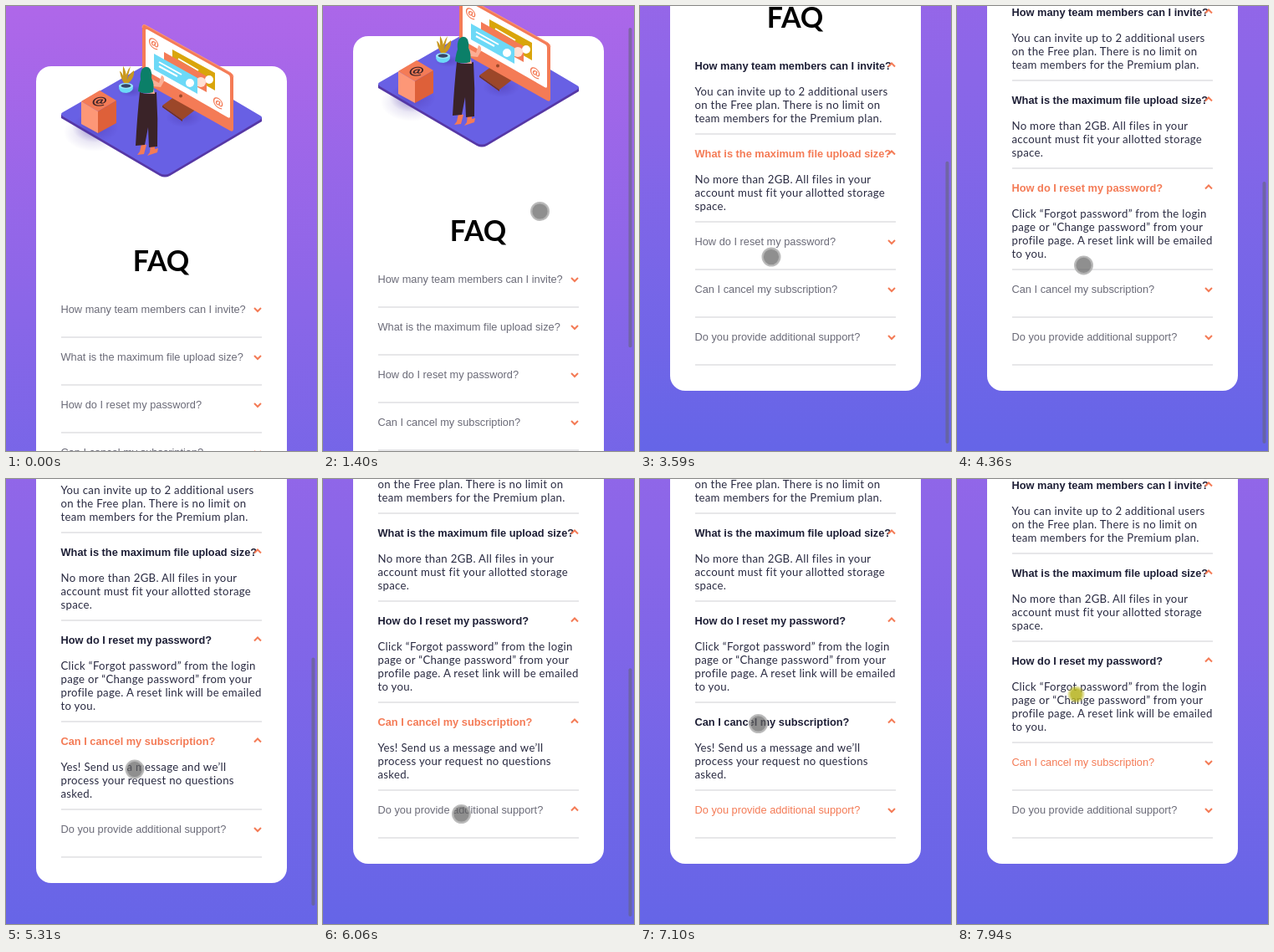
An HTML page for the animation above (8 s loop, 372x532 px).

```html
<!DOCTYPE html>
<html lang="en">
<head>
<meta charset="utf-8">
<title>FAQ</title>
<style>
html, body { margin: 0; width: 100%; height: 100%; overflow: hidden; background: #af67e9; }
#stage { display: block; width: 372px; height: 532px; }
.title { font: 700 34px Lato, "Open Sans", sans-serif; text-anchor: middle; }
.question { font: 12.8px "Liberation Sans", Arial, sans-serif; }
.answer { font: 13.2px Lato, "Open Sans", sans-serif; letter-spacing: .3px; fill: #2a2b42; }
.at { font: 700 15px Lato, sans-serif; text-anchor: middle; }
.chevron { fill: none; stroke: #f47b56; stroke-width: 2; }
</style>
</head>
<body>
<svg id="stage" viewBox="0 0 372 532">
  <defs>
    <linearGradient id="sky" x2="0" y2="1"><stop stop-color="#af67e9"/><stop offset="1" stop-color="#6565e7"/></linearGradient>
    <radialGradient id="shade"><stop stop-color="#4b35a8" stop-opacity=".45"/><stop offset="1" stop-color="#4b35a8" stop-opacity="0"/></radialGradient>
    <radialGradient id="glow"><stop offset=".6" stop-color="#b5b21c" stop-opacity=".85"/><stop offset="1" stop-color="#c9c640" stop-opacity=".25"/></radialGradient>
  </defs>
  <g id="page">
    <rect id="backdrop" width="372" fill="url(#sky)"/>
    <rect id="card" x="36" y="72" width="300" rx="18" fill="#fff"/>

    <g id="art">
      <ellipse cx="106" cy="151" rx="37" ry="23" fill="url(#shade)" opacity=".55"/>
      <path d="M66 130V134L184 203Q190 206 196 203L306 138V133Z" fill="#5637a5"/>
      <path d="M68 127L178 64Q184 60 190 64L304 131Q308 133 304 136L196 200Q190 203 184 200L68 132Q64 129 68 127Z" fill="#6860e4"/>
      <ellipse cx="107" cy="145" rx="28" ry="18" fill="url(#shade)"/>
      <ellipse cx="213" cy="133" rx="22" ry="12" fill="url(#shade)"/>
      <ellipse cx="150" cy="102" rx="16" ry="7" fill="url(#shade)"/>

      <path d="M143 94C141 83 138 78 136 78Q138 90 143 94C146 84 142 74 140 72Q139 86 143 94C151 91 154 82 153 77Q145 83 143 94L149 72Q142 80 143 94" fill="#c9981f"/>
      <path d="M135 95Q134 104 144 104Q153 103 152 95Z" fill="#6cd9f7"/>
      <ellipse cx="143.500" cy="95.500" rx="8.500" ry="3.500" fill="#9be8fb"/>
      <ellipse cx="143.500" cy="95.500" rx="6" ry="2.200" fill="#37446a"/>

      <path d="M90 114L112 101L132 113L110 126Z" fill="#f47b56"/>
      <path d="M90 114L110 126V152L90 141Z" fill="#fd9777"/>
      <path d="M110 126L132 113V140L110 152Z" fill="#de6039"/>
      <text class="at" transform="translate(110.500 117.500) scale(1.400 .9) skewX(-10)" fill="#3a2328">@</text>

      <path d="M187 119L202 108L228 123L211 136Z" fill="#9c4729"/>
      <path d="M187 119V121L211 138V136Z" fill="#74301c"/>
      <path d="M163 26Q163 21 167 23L269 80Q272 82 272 85V147Q272 151 268 149L163 90Z" fill="#f47b56"/>
      <path d="M167 29Q167 27 169 28L266 82Q268 83 268 86V132Q268 135 265 133L167 77Z" fill="#fff"/>
      <path d="M163 26Q163 21 167 23L269 80Q272 82 272 85" fill="none" stroke="#fd9777"/>
      <circle cx="209" cy="107.500" r="2" fill="#9c4729"/>
      <path d="M199 52L250 80V101L199 72Z" fill="#d9a50b"/>
      <path d="M206 63L230 77" stroke="#fff" stroke-width="2"/>
      <path d="M189 55L240 84V103L189 75Z" fill="#f47b56"/>
      <circle cx="243" cy="88" r="5" fill="#fff"/>
      <circle cx="233" cy="91" r="6" fill="#ffe0d4"/>
      <path d="M177 57L229 86V105L177 76Z" fill="#6cd9f7"/>
      <path d="M183 67L210 82M183 72L205 84" stroke="#fff" stroke-width="2"/>
      <circle cx="220" cy="92" r="5" fill="#fff"/>
      <text class="at" transform="translate(176.500 49) skewY(28)" fill="#f47b56">@</text>
      <text class="at" transform="translate(253.500 120) skewY(28)" fill="#f47b56">@</text>

      <path d="M162 165L160 174L157 178L165 177L168 166ZM173 166L172 175L169 179L181 175L182 170L178 171V165Z" fill="#f47b56"/>
      <path d="M160 103Q169 107 180 103Q182 135 181 168L171 169L170 145L166 166L155 167Q157 130 160 103Z" fill="#3a2328"/>
      <path d="M172 86L183 92L186 83Q190 84 189 90L185 97L176 96L178 105L164 104Z" fill="#fcae94"/>
      <path d="M163 75Q169 70 173 76Q175 81 174 86Q178 94 176 103Q166 106 158 102Q159 93 161 88Q160 80 163 75Z" fill="#0b7f68"/>
    </g>

    <text class="title" x="185.500" y="317">FAQ</text>
    <g id="items"></g>
  </g>
  <rect id="thumb" x="365.500" width="4" rx="2" fill="#65657a"/>
  <circle id="cursor" r="10.300" stroke-width="2.400"/>
</svg>

<script>
const LOOP = 8000, VIEW = 532, CLOSED_HEIGHT = 727;
const get = id => document.getElementById(id);
const set = (node, attrs) => { for (const k in attrs) node.setAttribute(k, attrs[k]); };

const entries = [
  { q: "How many team members can I invite?", open: 1960,
    a: ["You can invite up to 2 additional users", "on the Free plan. There is no limit on", "team members for the Premium plan."] },
  { q: "What is the maximum file upload size?", open: 2790,
    a: ["No more than 2GB. All files in your", "account must fit your allotted storage", "space."] },
  { q: "How do I reset my password?", open: 3910,
    a: ["Click “Forgot password” from the login", "page or “Change password” from your", "profile page. A reset link will be emailed", "to you."] },
  { q: "Can I cancel my subscription?", open: 4740, close: 7280,
    a: ["Yes! Send us a message and we’ll", "process your request no questions", "asked."] },
  { q: "Do you provide additional support?", open: 6050, close: 6920,
    a: ["Chat and email support is available", "24/7. Phone lines are open during", "normal business hours."] }
];

// Taps move the sticky hover state to the tapped entry.
const taps = entries.flatMap((e, i) => [e.open, e.close].filter(Boolean).map(time => ({ time, i })))
  .sort((a, b) => a.time - b.time);

const scrollKeys = [[1330, 0], [1400, 36], [1540, 103], [2950, 103], [3590, 291], [4050, 291],
  [4340, 355], [5100, 355], [5510, 403], [6250, 403], [6550, 451]];
const cursorKeys = [[790, 386, 205], [1330, 259.5, 245.5], [1600, 259.5, 245.5], [1870, 218.5, 266.5],
  [2120, 218.5, 266.5], [2620, 170.5, 372.5], [2900, 170.5, 372.5], [3590, 157, 300], [3660, 154, 291],
  [4000, 154, 291], [4340, 151.5, 309.5], [4620, 151.5, 336], [5100, 151.5, 336], [5900, 165.5, 400.5],
  [6200, 165.5, 400.5], [6550, 165, 352], [6940, 165, 352], [7090, 141.5, 292.5], [7500, 141.5, 292.5], [7900, 142.5, 257.5]];
const thumbSpans = [[1330, 2010], [2950, 3780], [4050, 4720], [5100, 6810]];

const ramp = (t, from, length) => {
  const p = Math.min(1, Math.max(0, (t - from) / length));
  return p * p * (3 - 2 * p);
};

function sample(keys, t) {
  const next = keys.findIndex(k => k[0] > t);
  if (next === 0) return keys[0].slice(1);
  if (next < 0) return keys[keys.length - 1].slice(1);
  const a = keys[next - 1], b = keys[next];
  const p = ramp(t, a[0], b[0] - a[0]);
  return a.slice(1).map((v, i) => v + (b[i + 1] - v) * p);
}

get("items").innerHTML = entries.map(e => `<g>
  <text class="question" x="65.500">${e.q}</text>
  <path class="chevron" d="M-4 -2L0 2L4 -2"/>
  <svg class="answer" x="65" y="18" width="260">${e.a.map((line, i) => `<text x=".5" y="${13 + 16 * i}">${line}</text>`).join("")}</svg>
  <rect x="66" width="240" height="2" fill="#e7e7e9"/></g>`).join("");
const nodes = [...get("items").children].map(group => {
  const [question, chevron, answer, rule] = group.children;
  return { group, question, chevron, answer, rule };
});

function draw(t) {
  const tapped = taps.filter(tap => t >= tap.time + 50).pop();
  let y = 367;
  entries.forEach((e, i) => {
    const n = nodes[i];
    const isOpen = t >= e.open && !(t >= e.close);
    const grow = Math.round(16 * e.a.length * ramp(t, e.open, 280) * (1 - ramp(t, e.close ?? LOOP, 140)));
    const bold = isOpen && t >= e.open + 50;
    set(n.group, { transform: `translate(0 ${y})` });
    set(n.question, {
      "font-weight": bold ? 700 : 400,
      style: `font-weight:${bold ? 700 : 400}`,
      fill: tapped?.i === i ? "#f47b56" : bold ? "#1e1f36" : "#6b6b78"
    });
    set(n.chevron, { transform: isOpen ? "translate(301 -5.5) scale(1 -1)" : "translate(301 -4)" });
    set(n.answer, { height: grow, visibility: grow > 0 ? "visible" : "hidden" });
    set(n.rule, { y: 28 + grow });
    y += 57 + grow;
  });

  const height = CLOSED_HEIGHT + y - 652;
  const scroll = Math.min(sample(scrollKeys, t)[0], height - VIEW);
  set(get("backdrop"), { height });
  set(get("card"), { height: height - 144 });
  set(get("page"), { transform: `translate(0 ${-Math.round(scroll)})` });

  const track = 525 / height;
  const span = thumbSpans.filter(s => t >= s[0]).pop();
  set(get("thumb"), { y: scroll * track, height: VIEW * track - 2, opacity: span ? .6 * (1 - ramp(t, span[1], 230)) : 0 });

  const [cx, cy] = sample(cursorKeys, t);
  const glowing = t >= 7900;
  set(get("cursor"), {
    cx, cy,
    fill: glowing ? "url(#glow)" : "rgba(95,95,95,.7)",
    stroke: glowing ? "none" : "rgba(182,182,182,.9)",
    visibility: t >= 790 ? "visible" : "hidden"
  });
}

const start = performance.now();
function tick() {
  draw((performance.now() - start) % LOOP);
  requestAnimationFrame(tick);
}
tick();
</script>
</body>
</html>
```
